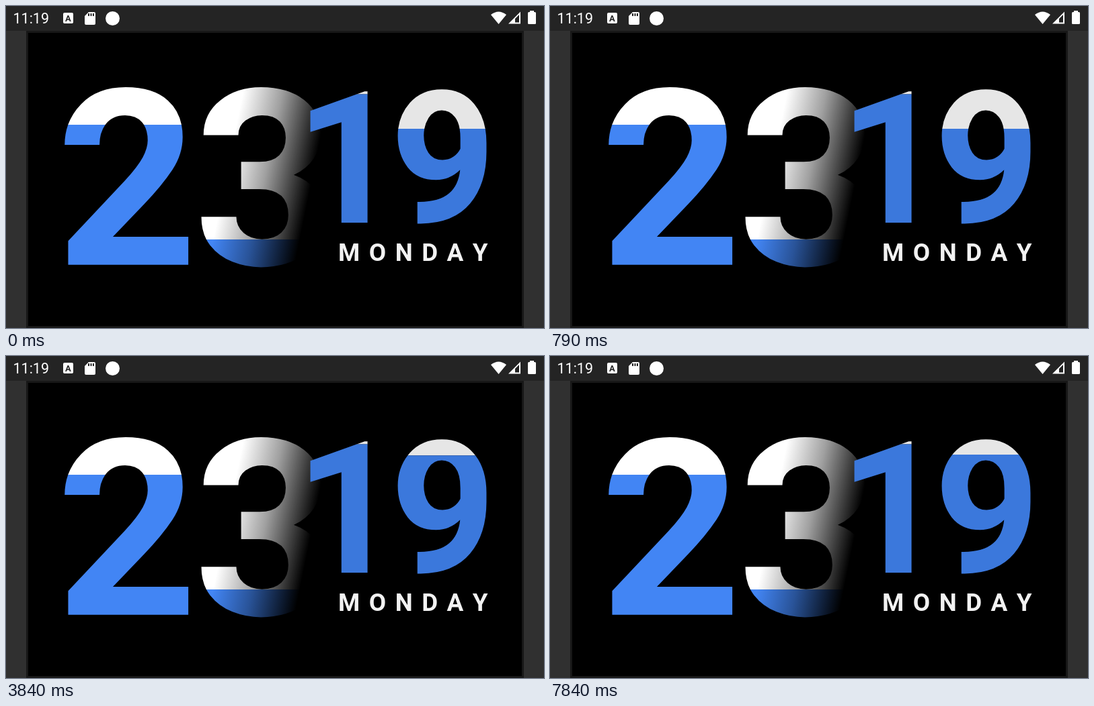
An HTML page with a canvas for the animation above (8 s loop, 800 by 480 pixels).

```html
<!DOCTYPE html>
<html lang="en">
<head>
<meta charset="utf-8">
<title>Filling clock</title>
<style>
  html, body { margin: 0; width: 100%; height: 100%; overflow: hidden; background: #000; }
  canvas { display: block; }
</style>
</head>
<body>
<canvas width="800" height="480"></canvas>
<script>
const ctx = document.querySelector('canvas').getContext('2d');
const LOOP = 8000, RISE_START = 3070, RISE_TIME = 1000;
const ICON = '#fff', BAR = '#242424', SIDE = '#303030';
const HOUR_LIQUID = '#4285f4', MINUTE_LIQUID = '#3b78dc', MINUTE_EMPTY = '#e6e6e6';

function rect(color, x, y, w, h, radius = 0) {
  ctx.fillStyle = color;
  ctx.beginPath();
  ctx.roundRect(x, y, w, h, radius);
  ctx.fill();
}

function shape(color, path) {
  ctx.fillStyle = color;
  ctx.fill(new Path2D(path));
}

function text(string, x, y, font, color, spacing = 0) {
  ctx.font = font + ' Roboto, sans-serif';
  ctx.letterSpacing = spacing + 'px';
  ctx.fillStyle = color;
  ctx.fillText(string, x, y);
}

// Tilted shade across the digit that lies behind the minutes.
function shade(light, middle) {
  const gradient = ctx.createLinearGradient(348, 150, 472, 175);
  gradient.addColorStop(0, light);
  gradient.addColorStop(0.45, middle);
  gradient.addColorStop(1, '#000');
  return gradient;
}

// A digit placed by its inked left edge, filled with liquid below `level`.
function digit(char, left, baseline, size, level, empty, liquid) {
  ctx.font = `bold ${size}px Roboto, sans-serif`;
  ctx.letterSpacing = '0px';
  const x = left + ctx.measureText(char).actualBoundingBoxLeft;
  for (const [color, top, bottom] of [[empty, 0, level], [liquid, level, 480]]) {
    ctx.save();
    ctx.beginPath();
    ctx.rect(0, top, 800, bottom - top);
    ctx.clip();
    ctx.fillStyle = color;
    ctx.fillText(char, x, baseline);
    ctx.restore();
  }
}

// cubic-bezier(0.4, 0, 0.2, 1), solved by bisection.
function ease(u) {
  let low = 0, high = 1, s;
  for (let i = 0; i < 24; i++) {
    s = (low + high) / 2;
    const x = 1.2 * (1 - s) ** 2 * s + 0.6 * (1 - s) * s * s + s ** 3;
    if (x < u) low = s; else high = s;
  }
  return s * s * (3 - 2 * s);
}

function statusBar() {
  text('11:19', 10.5, 26, '21.5px', ICON);
  rect(ICON, 85, 10, 15, 16, 2);
  text('A', 88, 23, 'bold 13px', BAR);
  shape(ICON, 'M123 9H131Q133 9 133 11V26Q133 28 131 28H119Q117 28 117 26V15Z');
  for (const x of [122, 125.5, 129]) rect(BAR, x, 11, 2, 4);
  rect(ICON, 148, 8, 21, 21, 10.5);
  shape(ICON, 'M721 13Q732.5 4 744 13L732.5 27Z');
  shape(ICON, 'M747 26.5L765 8.5V26.5Z');
  shape(BAR, 'M757 19L763 13V24.5H757Z');
  rect(ICON, 776, 9, 12, 18, 1.5);
  rect(ICON, 779, 7, 6, 3);
}

function draw(time) {
  const rise = ease(Math.min(1, Math.max(0, (time - RISE_START) / RISE_TIME)));

  rect(SIDE, 0, 0, 800, 480);
  rect(BAR, 0, 0, 800, 37);
  rect('#181818', 30, 37, 740, 443);
  rect('#000', 33, 40, 734, 437);
  statusBar();

  digit('2', 86, 385.8, 367, 177, '#fff', HOUR_LIQUID);
  digit('3', 290.5, 385.8, 367, 348, shade('#fff', '#a0a0a0'), shade(HOUR_LIQUID, '#295398'));
  digit('1', 451.5, 323, 275, 131.5, MINUTE_EMPTY, MINUTE_LIQUID);
  digit('9', 579.5, 322.5, 275, 183 - 36 * rise, MINUTE_EMPTY, MINUTE_LIQUID);
  text('MONDAY', 494, 380, 'bold 36.8px', '#f2f2f2', 13.5);
}

ctx.fontKerning = 'none';
const start = performance.now();
function tick() {
  draw((performance.now() - start) % LOOP);
  requestAnimationFrame(tick);
}
tick();
</script>
</body>
</html>
```
